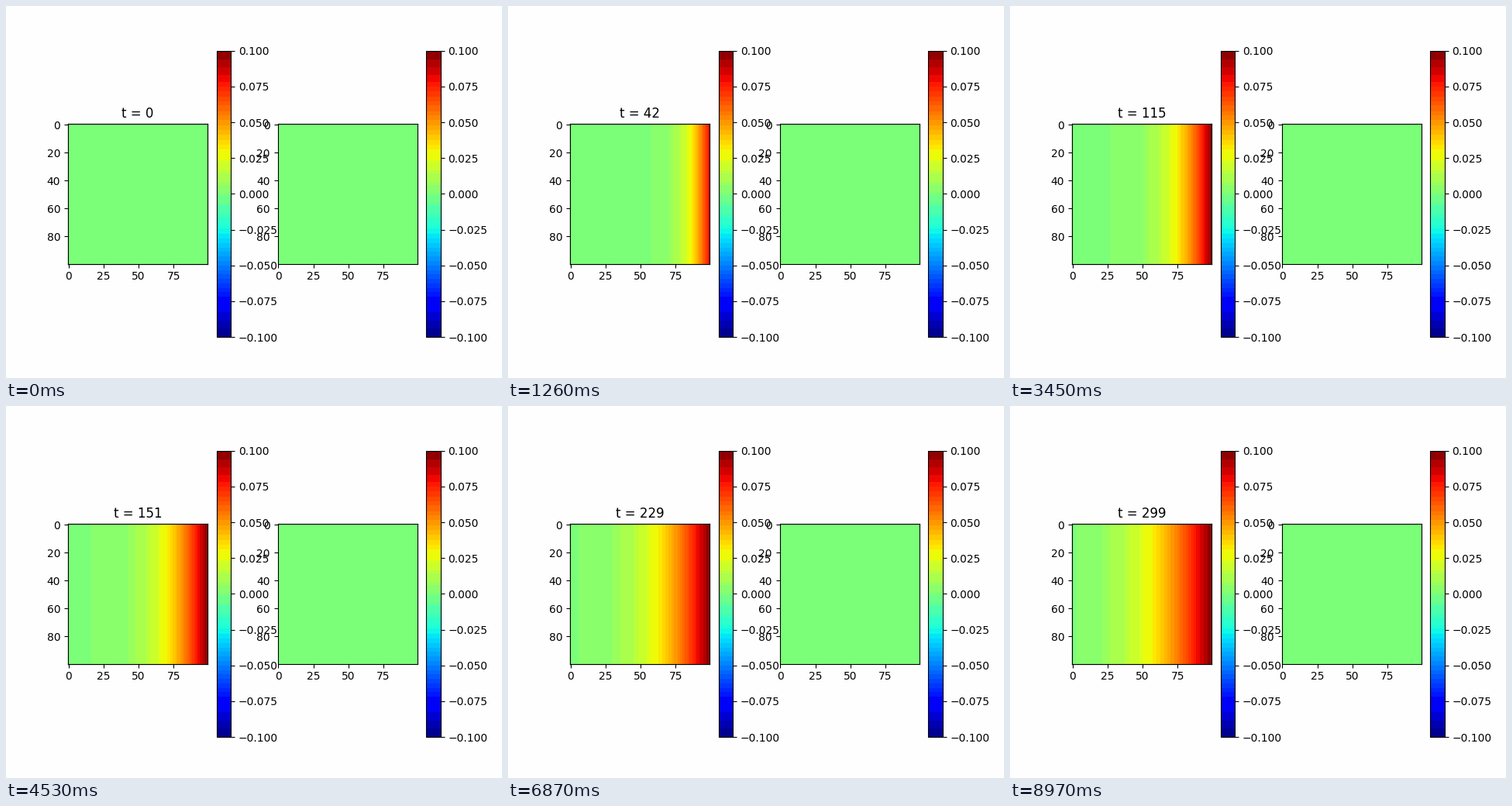
Recreate the animation shown at these times as a matplotlib script. Size 640x480 px, loop 9000 ms.

```python
import numpy as np
import matplotlib.pyplot as plt
from matplotlib.animation import FuncAnimation
from matplotlib.colors import ListedColormap

N, STEPS = 100, 300
WALL, OMEGA = 0.1, 0.1
PAPER = "#fefefe"


def banded_jet():
    """Jet reduced to coarse colour cells: 3 bits red, 4 green, 3 blue."""
    rgb = plt.get_cmap("jet")(np.arange(256), bytes=True)[:, :3].astype(int)
    weight = np.ones(256)
    weight[128] = 1000  # zero fills most of the picture
    cells = (rgb[:, 0] // 32) * 128 + (rgb[:, 1] // 16) * 8 + rgb[:, 2] // 32
    out = np.zeros((256, 3))
    for c in np.unique(cells):
        m = cells == c
        out[m] = np.average(rgb[m], axis=0, weights=weight[m])
    return ListedColormap(out / 255)


def shear_flow():
    """Lattice Boltzmann flow between a fixed left and a moving right wall."""
    left, rest, right = np.zeros((3, N))
    rows = [np.zeros(N)]
    for _ in range(STEPS - 1):
        u = rows[-1]
        rest = rest + OMEGA * (2 * u / 3 - rest)
        lo = left + OMEGA * (u / 6 - left)
        ro = right + OMEGA * (u / 6 - right)
        left = np.append(lo[1:], WALL / 3 - ro[-1])
        right = np.append(-lo[0], ro[:-1])
        rows.append(left + rest + right)
    return np.array(rows)


def panel(pos, cmap):
    ax = fig.add_subplot(1, 2, pos)
    im = ax.imshow(np.zeros((N, N)), cmap=cmap, vmin=-WALL, vmax=WALL)
    bar = fig.colorbar(im, ax=ax)
    return ax, im, bar.ax


fig = plt.figure(figsize=(6.4, 4.8), dpi=100, facecolor=PAPER)
cmap = banded_jet()
flow = shear_flow()
ax, im, bar1 = panel(1, cmap)
ax2, _, bar2 = panel(2, cmap)

# Keep the still parts as one background picture, for speed.
fig.canvas.draw()
still = np.array(fig.canvas.buffer_rgba())
for part in (bar1, ax2, bar2, ax.xaxis, ax.yaxis):
    part.set_visible(False)
fig.figimage(still, zorder=-1)
title = ax.set_title("t = 0", y=1.0)


def update(t):
    im.set_data(np.tile(flow[t], (N, 1)))
    title.set_text(f"t = {t}")
    return im, title


anim = FuncAnimation(fig, update, frames=STEPS, interval=30,
                     repeat=True, repeat_delay=0, blit=False)
plt.show()
```
